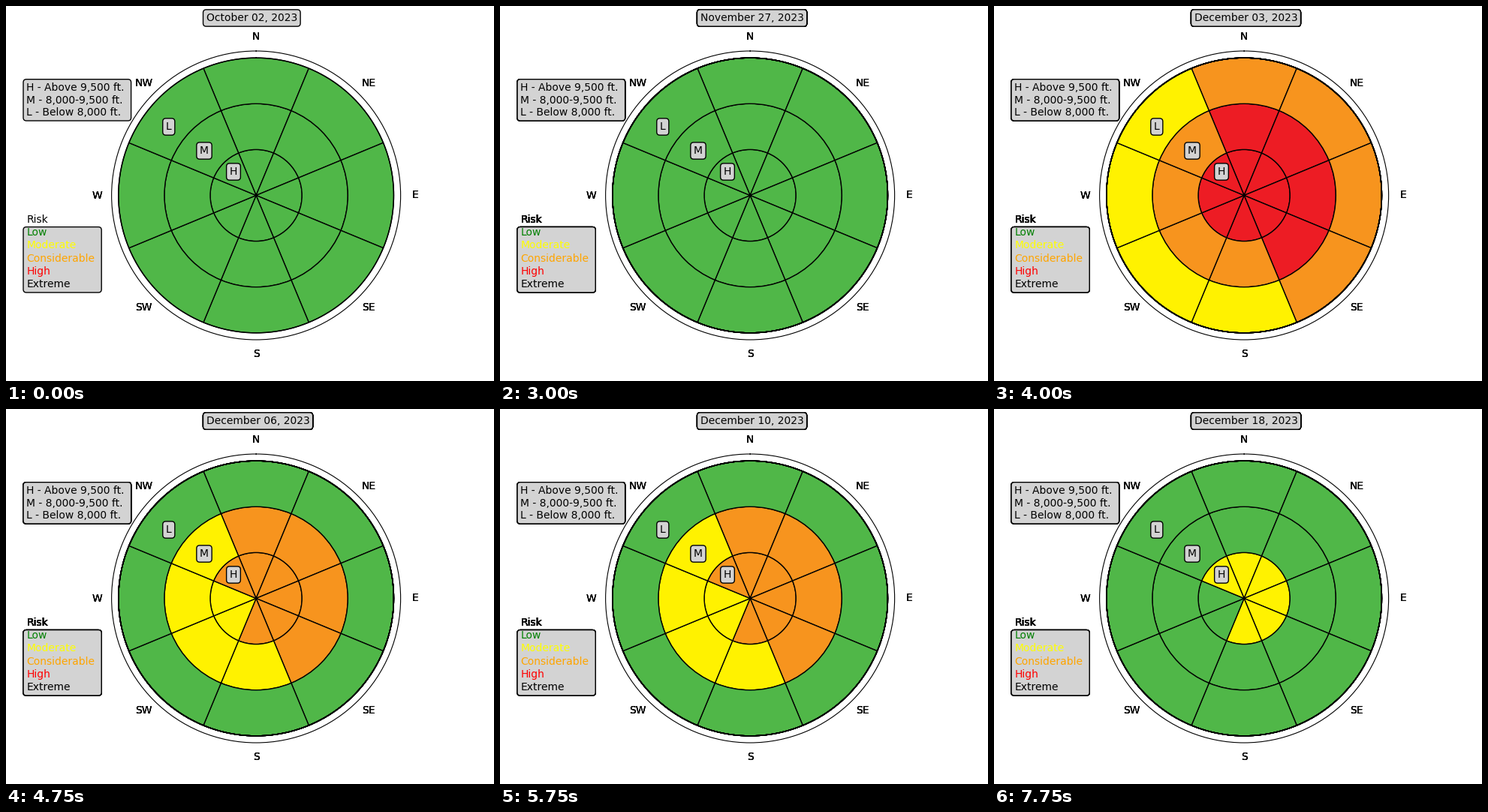
Animation of 650x500 px, one loop 8 s. Source, as a matplotlib script:

```python
import numpy as np
import matplotlib.pyplot as plt
from matplotlib.animation import FuncAnimation
from matplotlib.patches import FancyBboxPatch
from matplotlib.transforms import Affine2D

W, H = 650, 500
FRAMES, INTERVAL = 32, 250
LAYERS = 8  # outlines darken as they are painted over again

COLORS = {"1": "#50b748", "2": "#fff200", "3": "#f7941e", "4": "#ed1c24"}
GREY = "lightgray"

DAYS = {
    "October": [2, 12, 26, 28, 30],
    "November": [6, 9, 13, 17, 19, 20, 24, 27, 30],
    "December": range(1, 19),
}
DATES = [f"{month} {day:02d}, 2023" for month, days in DAYS.items() for day in days]

# First frame of each forecast: high, middle, low ring; sectors N, NE, ... NW
FORECASTS = {
    0: ("11111111", "11111111", "11111111"),
    14: ("22222112", "22222111", "11111111"),
    15: ("33333333", "33332222", "22221111"),
    16: ("44444444", "44443333", "33332222"),
    18: ("33333333", "33332222", "22221111"),
    19: ("33333223", "33332222", "11111111"),
    21: ("33333333", "33332222", "22222222"),
    23: ("33333223", "33332222", "11111111"),
    25: ("22222222", "22222222", "11111111"),
    26: ("22222222", "22222111", "11111111"),
    29: ("22222112", "22221111", "11111111"),
    30: ("22221111", "11111111", "11111111"),
    31: ("22222112", "11111111", "11111111"),
}

plt.rcParams["font.family"] = "DejaVu Sans"
plt.rcParams["font.size"] = 10
fig = plt.figure(figsize=(W / 100, H / 100), dpi=100, facecolor="white")
pixels = Affine2D().scale(1 / W, -1 / H).translate(0, 1) + fig.transFigure


def write(x, y, text, **style):
    return fig.text(x, y, text, transform=pixels, **style)


def panel(x0, y0, x1, y1):
    return fig.add_artist(FancyBboxPatch(
        (x0, y0), x1 - x0, y1 - y0, transform=pixels, linewidth=1, zorder=1,
        boxstyle="round,pad=0,rounding_size=4.17", facecolor=GREY, edgecolor="black"))


def tag(x, y, text, **style):
    return write(x, y, text, bbox=dict(boxstyle="round", facecolor=GREY), **style)


# Rose
ax = fig.add_subplot(projection="polar")
ax.set_theta_zero_location("N")
ax.set_theta_direction(-1)
ax.set_xticks([])
ax.set_yticks([])
ax.grid(False)
theta = np.arange(8) * np.pi / 4
rings = [ax.bar(theta, 1, width=np.pi / 4, bottom=r, edgecolor="black", linewidth=1)
         for r in range(3)]
ax.set_ylim(0, 3.15)

for angle, name in zip(theta, ["N", "NE", "E", "SE", "S", "SW", "W", "NW"]):
    for _ in range(3):
        ax.text(angle, 3.468, name, ha="center", va="center")

for x, y, name in [(303, 221, "H"), (264, 193, "M"), (216.8, 161, "L")]:
    tag(x, y, name, ha="center", va="center")

# Legends
for y, line in [(113, "H - Above 9,500 ft."), (130, "M - 8,000-9,500 ft."),
                (146, "L - Below 8,000 ft.")]:
    write(27, y, line)

levels = [("Low", "green"), ("Moderate", "yellow"), ("Considerable", "orange"),
          ("High", "red"), ("Extreme", "black")]
for k, (name, color) in enumerate(levels):
    write(27.5, 306 + 17.3 * k, name, color=color)

# Parts painted again on every step
circle = np.linspace(0, 2 * np.pi, 361)
dates, layers = [], []
for _ in range(LAYERS):
    dates.append(tag(266.7, 20, ""))
    layers.append([
        dates[-1],
        panel(23, 97.7, 166.6, 153),
        panel(23, 294.6, 127.2, 382),
        write(27.5, 289, "Risk"),
        ax.plot(circle, np.full(361, 3), color="black", linewidth=1)[0],
    ])


def update(i):
    forecast = FORECASTS[max(k for k in FORECASTS if k <= i)]
    for bars, ratings in zip(rings, forecast):
        for bar, rating in zip(bars, ratings):
            bar.set_facecolor(COLORS[rating])
    for date in dates:
        date.set_text(DATES[i])
    for k, layer in enumerate(layers):
        for artist in layer:
            artist.set_visible(k <= i)
    return []


anim = FuncAnimation(fig, update, frames=FRAMES, interval=INTERVAL,
                     repeat=True, repeat_delay=0, blit=False)
plt.show()
```
